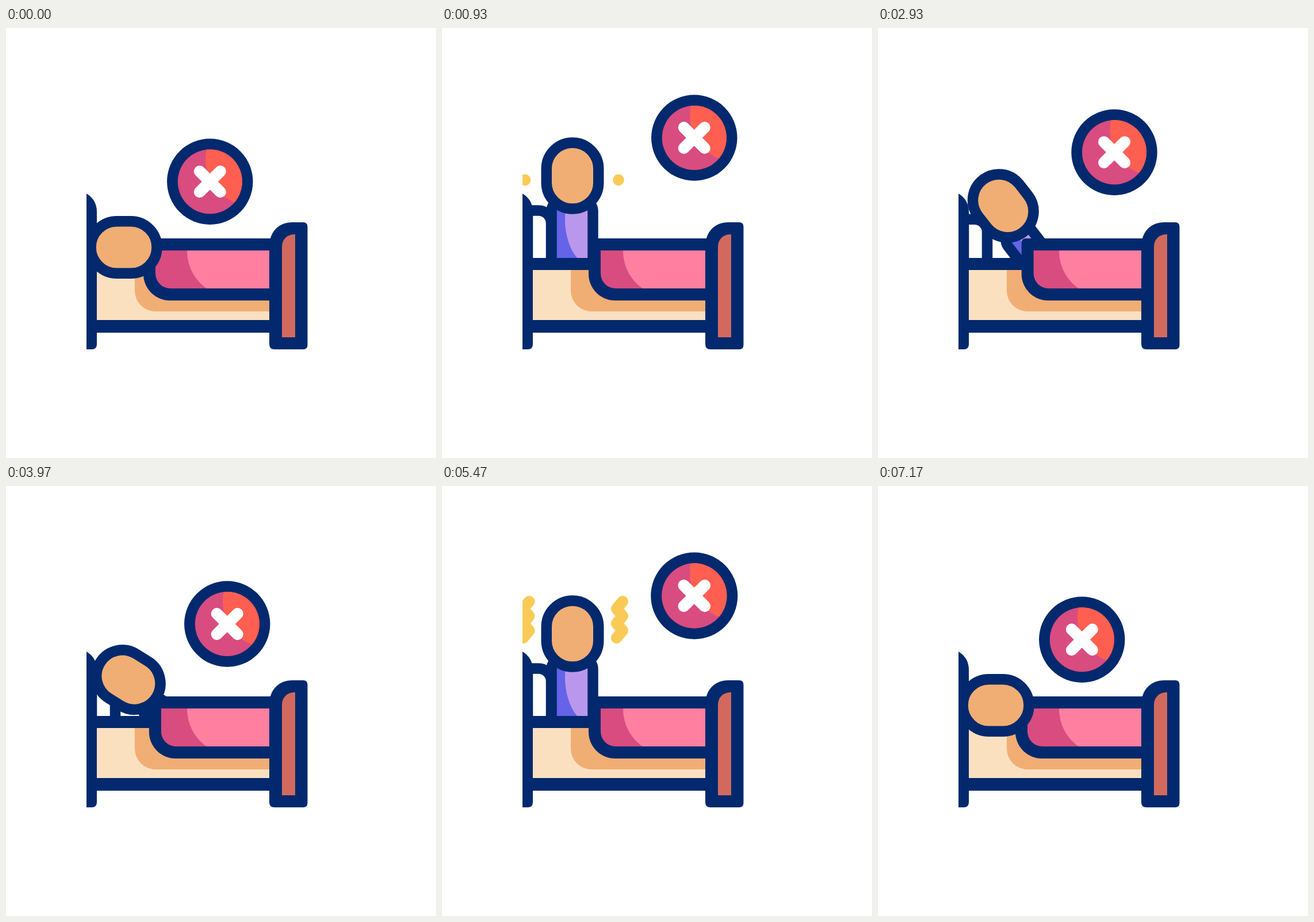
Write an HTML page that moves like this. It is 748x748 px and loops after 7200 ms.

```html
<!DOCTYPE html>
<html lang="en">
<head>
<meta charset="utf-8">
<title>Restless sleeper</title>
<style>
  html, body { margin: 0; width: 100%; height: 100%; overflow: hidden; background: #fff; }
  svg { display: block; width: 100vw; height: 100vh; }
  .navy { fill: #02296d; }
  .line { stroke: #02296d; stroke-width: 18.5; }
  .skin { fill: #f1ae74; }
  .wave { fill: none; stroke: #f9cb56; stroke-width: 19.5; stroke-linecap: round; stroke-linejoin: round; }
</style>
</head>
<body>
<svg viewBox="0 0 748 748">
  <clipPath id="edge"><rect x="140" width="608" height="748"/></clipPath>
  <g clip-path="url(#edge)">
    <path id="pillow" class="line" fill="#fff" d="M149 317.5H168A22 22 0 0 1 190 339.5V450H149Z"/>

    <g id="torso">
      <path id="shirt" fill="#6563e8"/>
      <path id="shirtLight" fill="#b997ec"/>
      <path id="shirtLine" class="line" fill="none"/>
    </g>

    <!-- mattress -->
    <rect class="navy" x="150" y="400" width="315" height="130"/>
    <rect x="158" y="421" width="300" height="87" fill="#fbe0c0"/>
    <path class="skin" d="M224 421V457A36 36 0 0 0 260 493H458V421Z"/>

    <!-- blanket -->
    <path id="blanketEdge" class="navy"/>
    <path id="blanket" fill="#d84c80"/>
    <path fill="#ff7fa1" d="M315 387C315 417 330 440 349 453H458V387Z"/>

    <!-- bed ends -->
    <path class="navy" d="M140 288Q158 299 158 320V550Q158 559 149 559H140Z"/>
    <path class="navy" d="M458 380C458 355 474 338 498 338H517Q524.5 338 524.5 345.5V551Q524.5 559 517 559H467Q458 559 458 550Z"/>
    <path fill="#d2695f" d="M480 538V382C480 367 489 359 503 359V538Z"/>

    <rect id="head" class="skin line" x="-45.25" y="-57.5" width="90.5" height="115" rx="45.25"/>

    <path id="waveL" class="wave" transform="translate(-162.5)"/>
    <path id="waveR" class="wave"/>

    <g id="badge">
      <circle class="navy" r="74.7"/>
      <circle r="56" fill="#d84c80"/>
      <path fill="#ff5f51" d="M-6 -55.7C-14 -12 8 22 43 36A56 56 0 0 0 -6 -55.7Z"/>
      <path d="M-18 -18L18 18M18 -18L-18 18" stroke="#fff" stroke-width="20" stroke-linecap="round"/>
    </g>
  </g>
</svg>
<script>
const LOOP = 3600;          // one wake-and-lie-down cycle; two fill 7200 ms
const RISE = 920, FALL = 2732, FALL_TIME = 517;
const PULSE = (FALL - RISE) / 4;

const el = Object.fromEntries([...document.querySelectorAll('[id]')].map(n => [n.id, n]));
const set = (name, key, value) => el[name].setAttribute(key, value);
const lerp = (a, b, k) => a + (b - a) * k;
const ease = (t, start, time) => {
  const u = Math.min(1, Math.max(0, (t - start) / time));
  return u * u * (3 - 2 * u);
};
// 1 is lying down, 0 is sitting up
const lying = (t, rise, fall) => 1 - ease(t, 0, rise) + ease(t, fall, FALL_TIME);

function drawTorso(p, place) {
  const l = -36.5, r = 35.5 - 53 * p;
  const c = Math.min(15, (r - l) / 2);
  const d = `M${l} 170V${47 + c}Q${l} 47 ${l + c} 47H${r - c}Q${r} 47 ${r} ${47 + c}V170`;
  set('torso', 'transform', place);
  set('shirt', 'd', d);
  set('shirtLine', 'd', d);
  const x = Math.min(r, -10);
  set('shirtLight', 'd', r > -10 ? `M${x} 50C-18 80 -10 125 ${Math.min(r, 10)} 145H${r}V50Z` : '');
}

function drawBlanket(p) {
  const x = lerp(276, 260, p), o = x - 21;
  set('blanketEdge', 'd', `M470 366H${o + 8}Q${o} 366 ${o} 374V428A46 46 0 0 0 ${o + 46} 474H470Z`);
  set('blanket', 'd', `M458 387H${x}V427A26 26 0 0 0 ${x + 26} 453H458Z`);
}

// The zigzag grows upwards from its lowest point
function drawWaves(t) {
  const grow = ease(t, RISE, PULSE) - ease(t, FALL - PULSE, PULSE);
  const shown = t >= RISE && t < FALL;
  const reach = grow * 5, swing = lerp(2, 5.3, grow);
  const point = i => {
    const k = i % 2, tri = Math.floor(i) % 2 ? 1 - k % 1 : k;
    return `${(309 + swing * (2 * tri - 1)).toFixed(2)} ${(264.3 - 12.7 * i).toFixed(2)}`;
  };
  let d = 'M' + point(0);
  for (let i = 1; i < reach; i++) d += 'L' + point(i);
  d += 'L' + point(reach);
  for (const name of ['waveL', 'waveR']) set(name, 'd', shown ? d : '');
}

function draw(t) {
  const p = lying(t, RISE, FALL - 32);
  const b = lying(t, RISE, FALL);
  const place = `translate(${lerp(227, 205, p)} ${lerp(257, 381.5, p)}) rotate(${-90 * p})`;
  set('head', 'transform', place);
  drawTorso(p, place);
  set('pillow', 'transform', `translate(0 ${36 * p})`);
  drawBlanket(lying(t, 640, FALL));
  drawWaves(t);

  const beat = t > RISE && t < FALL ? Math.sin(Math.PI * (t - RISE) / PULSE) ** 2 : 0;
  set('badge', 'transform',
    `translate(${lerp(438.8, 354.8, b)} ${lerp(191, 267.2, b)}) scale(${1 + 0.12 * beat})`);
}

const begin = performance.now();
function tick() {
  draw((performance.now() - begin) % LOOP);
  requestAnimationFrame(tick);
}
tick();
</script>
</body>
</html>
```
